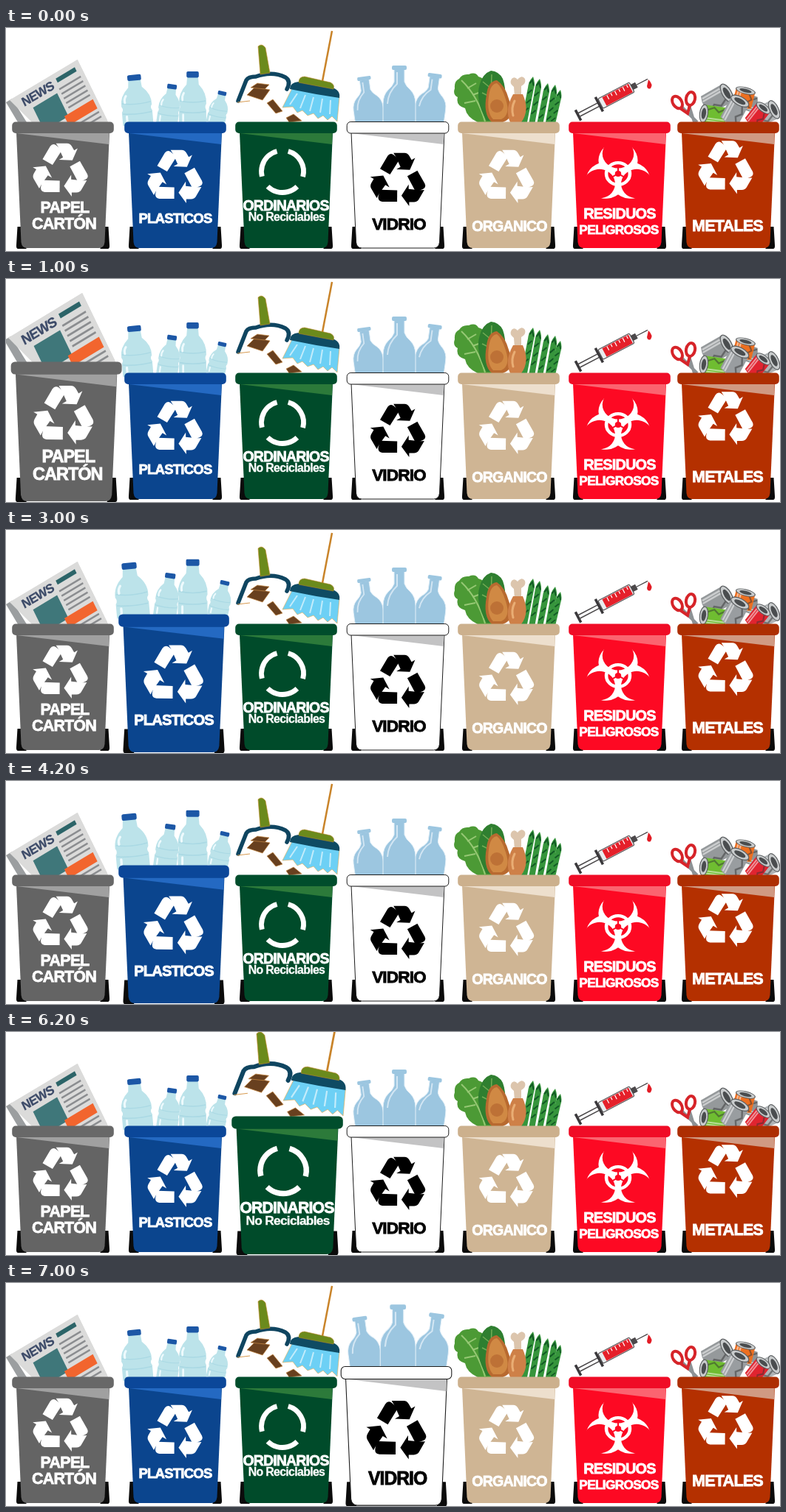
Animation of 1047x303 px, one loop 8000 ms. Source, as an HTML page:

```html
<!DOCTYPE html>
<html lang="es">
<head>
<meta charset="utf-8">
<title>Reciclaje</title>
<style>
html, body { margin: 0; width: 100%; height: 100%; overflow: hidden; background: #fff; }
svg { display: block; width: 100%; height: 100%; }
text { font: bold 19.400px "Liberation Sans", Arial, sans-serif; letter-spacing: -.04em; text-anchor: middle; fill: #fff; stroke: #fff; stroke-width: .8px; }
.grow { animation: grow 8s step-end infinite; }
#papel { --to: translate(-2.3px, -28.4px) scale(1.09, 1.105); animation-delay: -7s; }
#plastico { --to: translate(-21.9px, -25px) scale(1.087, 1.094); animation-delay: -5s; }
#ordinario { --to: translate(-34.1px, -25px) scale(1.094); animation-delay: -3s; }
#vidrio { --to: translate(-48.1px, -26.8px) scale(1.087, 1.1); animation-name: growLast; }
@keyframes grow { 0% { transform: var(--to); } 25%, 100% { transform: none; } }
@keyframes growLast { 0% { transform: none; } 87.5% { transform: var(--to); } 100% { transform: none; } }
</style>
</head>
<body>
<svg viewBox="0 0 1047 303" preserveAspectRatio="none">
<defs>
  <g id="bin">
    <path d="M8 270H20V300H9Q6 300 6.500 295ZM131 270H120V300H130Q133 300 132.500 295Z" fill="#0b0b0b"/>
    <path d="M6.500 142H132.500L126 291Q125 299 118 299H21Q14 299 13 291Z" style="fill:var(--body);stroke:var(--line,none)"/>
    <path d="M7 143H132L131.500 158Z" style="fill:var(--shade)"/>
    <rect x=".7" y="127.500" width="137.600" height="15.500" rx="5" style="fill:var(--rim);stroke:var(--line,none)"/>
  </g>

  <g id="arm">
    <path d="M-31-20L-18-42Q-14-48-8-44Q-2-40 1-34L-14-10Z"/>
    <path d="M-8-47H11Q16-47 19-42L23-35L29-38.500L20-18L-3-19L4-23L-1-34Q-4-41-8-47Z"/>
  </g>
  <g id="recycle" transform="scale(.79)">
    <use href="#arm"/>
    <use href="#arm" transform="rotate(120)"/>
    <use href="#arm" transform="rotate(240)"/>
  </g>

  <circle id="lobe" cy="-11" r="15" fill="#fff"/>
  <circle id="cut" cy="-16.500" r="12" fill="#000"/>
  <path id="slit" d="M0 0V-7" stroke="#000" stroke-width="1.200"/>
  <mask id="hazard" maskUnits="userSpaceOnUse" x="-30" y="-30" width="60" height="60">
    <use href="#lobe"/><use href="#lobe" transform="rotate(120)"/><use href="#lobe" transform="rotate(240)"/>
    <use href="#cut"/><use href="#cut" transform="rotate(120)"/><use href="#cut" transform="rotate(240)"/>
    <circle r="9" fill="none" stroke="#fff" stroke-width="2.600"/>
    <circle r="2.400" fill="#000"/>
    <use href="#slit"/><use href="#slit" transform="rotate(120)"/><use href="#slit" transform="rotate(240)"/>
  </mask>

  <g id="pet">
    <path d="M-8 7H8L9 17Q21 28 20 42Q17 46 20 50V68H-20V50Q-17 46-20 42Q-21 28-9 17Z" fill="#bce3ea"/>
    <path d="M-19 38Q0 42 19 38M-19 52Q0 55 19 52" fill="none" stroke="#aad9e4" stroke-width="1.500"/>
    <path d="M-13 28Q-16 32-15 37M-14 56V64" fill="none" stroke="#eefafd" stroke-width="3" stroke-linecap="round"/>
    <rect x="-9" width="18" height="8" rx="2" fill="#1c57a6"/>
  </g>

  <g id="flask">
    <path d="M-7 5V22Q-9 28-15 33Q-22 40-22 52V80H22V52Q22 40 15 33Q9 28 7 22V5Z" stroke="#e4f0f8"/>
    <rect x="-10" width="20" height="6" rx="2"/>
    <path d="M-3 9V25Q-15 36-16 52" fill="none" stroke="#d3e6f3" stroke-width="2"/>
  </g>

  <g id="stalk">
    <path d="M0 0Q5 8 4 16V64H-4V16Q-5 8 0 0Z" fill="#36953c"/>
    <path d="M-3 10L0 5L3 12M-3 24L2 18M-2 37L3 31M-3 49L2 43" fill="none" stroke="#125a25" stroke-width="2"/>
  </g>

  <g id="can">
    <path d="M-11-12H11V14Q0 19-11 14Z" fill="currentColor"/>
    <path d="M-8-8V14M-5-8V15" stroke="#fff" stroke-opacity=".5" stroke-width="2"/>
    <path d="M5-8L9 0L4 6L9 14" fill="none" stroke="#333" stroke-opacity=".5" stroke-width="2"/>
    <ellipse cy="-12" rx="11" ry="5" fill="#c9cccd" stroke="#5d6062"/>
    <ellipse cy="-12" rx="7" ry="2.800" fill="#4a4d4f"/>
  </g>
</defs>

<g id="papel" class="grow">
  <path d="M0 101L8 96L28 128H16Z" fill="#9b9ea0"/>
  <g transform="matrix(.857 -.515 .44 .9 5 98)">
    <path d="M0 0H107V92L23 42Z" fill="#d8d8d7"/>
    <path d="M0 0H107V94H100L14 42Z" fill="#dbdbda"/>
    <text x="38" y="18" style="font-size:17px;fill:#3c4a68;stroke:#3c4a68;stroke-width:.3px">NEWS</text>
    <path d="M69 7H99V13H69Z" fill="#2c6468"/>
    <path d="M24 25H62V60H24Z" fill="#3f777a"/>
    <path d="M67 22H101M67 29H101M67 36H101M67 43H101M67 50H101" stroke="#8b8d90" stroke-width="2.500"/>
    <path d="M57 57H102V71H57Z" fill="#f2652e"/>
    <path d="M54 76H102M64 83H102" stroke="#8b8d90" stroke-width="2.500"/>
  </g>
  <use href="#bin" x="7.500" style="--body:#646464;--rim:#686868;--shade:#a0a0a0"/>
  <use href="#recycle" x="74" y="194" fill="#fff"/>
  <text x="79.500" y="251" style="font-size:21.500px">PAPEL</text>
  <text x="78.500" y="273" style="font-size:21.500px">CARTÓN</text>
</g>

<g id="plastico" class="grow">
  <use href="#pet" transform="translate(173 63.500) rotate(-5) scale(1.030 1)"/>
  <use href="#pet" transform="translate(225 76.500) rotate(8) scale(.72 .8)"/>
  <use href="#pet" transform="translate(252.500 59) scale(.92 1.050)"/>
  <use href="#pet" transform="translate(293 86) rotate(13) scale(.64 .66)"/>
  <use href="#bin" x="159.500" style="--body:#0b458e;--rim:#0b4799;--shade:#2469c2"/>
  <use href="#recycle" x="229" y="203" fill="#fff"/>
  <text x="229" y="265" style="font-size:18.500px">PLASTICOS</text>
</g>

<g id="ordinario" class="grow">
  <path d="M321 101L330 70Q333 63 343 64Q361 57 378 63Q388 68 383 76L397 83L389 101L312 103Z" fill="#fff"/>
  <path d="M314 99L325 71Q328 66 338 66Q360 58 378 67Q386 72 380 83" fill="none" stroke="#0f4560" stroke-width="5.500" stroke-linecap="round"/>
  <path d="M313 101L330 99" stroke="#d79a50"/>
  <path d="M341 25Q346 20 351 27L357 61L344 63Z" fill="#6b8a1c" stroke="#c98b2d" stroke-width=".6"/>
  <g fill="#68401f" stroke="#c88a45" stroke-width=".7">
    <path d="M326 91L337 80L357 84L347 98Z"/>
    <path d="M331 81L340 75L356 77L350 83Z"/>
    <path d="M353 102L361 97L374 113L365 116Z"/>
    <path d="M379 122L389 117L400 126L383 128Z"/>
  </g>
  <path d="M441 4L428 72" stroke="#c9842a" stroke-width="2.500"/>
  <path d="M388 80L451 94L448 127L441 120L435 125L429 119L422 123L416 116L408 119L401 112L394 115L388 107L374 108Z" fill="#6dd0f5" stroke="#eaa94a" stroke-width=".6"/>
  <path d="M394 89L384 104M405 91L398 109M416 94L411 113M428 96L425 115M439 98L438 117" stroke="#c3ecfb" stroke-width="2"/>
  <path d="M384 83Q384 74 396 73L439 80Q453 84 451 95Q417 90 384 83Z" fill="#0f4b63"/>
  <path d="M396 74Q396 66 404 66L439 74Q445 77 443 83Z" fill="#6b8a1c" stroke="#bb872d" stroke-width=".6"/>
  <use href="#bin" x="309.500" style="--body:#004b2a;--rim:#004d2c;--shade:#2c7a3a"/>
  <circle cx="374" cy="195" r="28.500" fill="none" stroke="#fff" stroke-width="6.800" stroke-dasharray="44 15.690" transform="rotate(-74.200 374 195)"/>
  <text x="378.500" y="248">ORDINARIOS</text>
  <text x="379.500" y="262" style="font-size:15.800px;stroke-width:.3px">No Reciclables</text>
</g>

<g id="vidrio" class="grow">
  <g fill="#9cc6e0">
    <use href="#flask" transform="translate(484 66) rotate(-8) scale(.92 .85)"/>
    <use href="#flask" transform="translate(580.500 62) rotate(8) scale(.95 .9)"/>
    <use href="#flask" transform="translate(532 51)"/>
  </g>
  <use href="#bin" x="460.500" style="--body:#fff;--rim:#fff;--shade:#c3c3c4;--line:#1c1c1c"/>
  <use href="#recycle" x="530.500" y="207" fill="#000"/>
  <text x="531.500" y="273.500" style="font-size:22.700px;fill:#000;stroke:#000">VIDRIO</text>
</g>

<g>
  <path d="M607 82Q606 72 613 69Q617 62 626 63Q635 59 639 66Q648 68 648 76Q656 88 653 100L662 128H638Q623 121 621 109Q608 105 611 94Q604 91 607 82Z" fill="#4c9a35"/>
  <path d="M616 71Q638 92 648 127M624 82L636 75M631 91L645 86M635 99L620 102" fill="none" stroke="#96c874" stroke-width="2"/>
  <path d="M650 126Q634 98 641 76Q645 62 656 58Q667 59 672 69Q681 94 666 126Z" fill="#2f7f30"/>
  <path d="M657 63Q655 96 659 126M656 82L645 73M656 94L644 88" fill="none" stroke="#74ad56" stroke-width="1.500"/>
  <use href="#stalk" transform="translate(713 66) rotate(11)"/>
  <use href="#stalk" transform="translate(722 69) rotate(10)"/>
  <use href="#stalk" transform="translate(733 75) rotate(11)"/>
  <use href="#stalk" transform="translate(743 77) rotate(10)"/>
  <use href="#stalk" transform="translate(750 84) rotate(13) scale(.9)"/>
  <path d="M650 91Q652 72 664 71Q675 78 680 96Q690 122 672 128H657Q645 117 650 91Z" fill="#b86a30"/>
  <path d="M653 93Q655 76 664 75Q671 80 676 97Q683 118 670 124H659Q650 115 653 93Z" fill="#d08944"/>
  <circle cx="664" cy="106" r="9" fill="#bd7136"/>
  <path d="M688 94L687 80Q680 75 684 69Q688 65 692 70Q698 63 702 69Q704 75 697 79L697 95Z" fill="#dcc5ad"/>
  <path d="M686 90H699Q709 112 697 128H682Q674 111 686 90Z" fill="#ce8048"/>
  <path d="M688 99Q683 109 686 119" fill="none" stroke="#e9ad74" stroke-width="3" stroke-linecap="round"/>
  <use href="#bin" x="610.500" style="--body:#cfb594;--rim:#ccb08d;--shade:#eddfcd"/>
  <use href="#recycle" x="677.500" y="203" fill="#fff"/>
  <text x="681" y="276" style="font-size:19.600px">ORGANICO</text>
</g>

<g>
  <g transform="translate(774 118.500) rotate(-27.600)">
    <path d="M0-8V8" stroke="#3a383b" stroke-width="3.500"/>
    <path d="M0-2.500H32M0 2.500H32" stroke="#4b484a" stroke-width="1.500"/>
    <path d="M32-11V11" stroke="#3a383b" stroke-width="3.500"/>
    <rect x="34" y="-7.500" width="48" height="15" rx="2" fill="#e8edef" stroke="#5a5658" stroke-width="1.200"/>
    <path d="M40-6.500H80V6.500H40Z" fill="#e5202a"/>
    <path d="M47-6V0M53-6V-2M59-6V0M65-6V-2M71-6V0M77-6V-2" stroke="#fff" stroke-width="1.200"/>
    <path d="M82-4H89V4H82Z" fill="#4b484a"/>
    <path d="M89 0H106" stroke="#4b484a" stroke-width="1.300"/>
  </g>
  <path d="M869 70Q876 77 872 82Q868 84 867 79Z" fill="#e21c25"/>
  <use href="#bin" x="760.500" style="--body:#fd0923;--rim:#f00c26;--shade:#fb6470"/>
  <g transform="translate(828 198) scale(1.770 1.650)">
    <path d="M-30-30H30V30H-30Z" fill="#fff" mask="url(#hazard)"/>
  </g>
  <text x="830" y="258.500" style="font-size:19.900px">RESIDUOS</text>
  <text x="829" y="279.500" style="font-size:17.300px">PELIGROSOS</text>
</g>

<g>
  <use href="#can" transform="translate(962 96) rotate(60) scale(1.250)" color="#95999b"/>
  <use href="#can" transform="translate(1000 100) rotate(-72)" color="#8f9395"/>
  <use href="#can" transform="translate(998 95) rotate(14) scale(1.200 .85)" color="#ed6f20"/>
  <use href="#can" transform="translate(1026 117) rotate(65) scale(1.200)" color="#b0b4b6"/>
  <use href="#can" transform="translate(1017 118) rotate(38)" color="#e02430"/>
  <use href="#can" transform="translate(957 118) rotate(-82) scale(1.100)" color="#6fbd31"/>
  <use href="#can" transform="translate(986 112) rotate(28) scale(1.200)" color="#999da0"/>
  <g fill="none">
    <path d="M914 107L935 128M924 105L931 128" stroke="#8d9295" stroke-width="4"/>
    <ellipse cx="908" cy="101" rx="6" ry="9" transform="rotate(-32 908 101)" stroke="#d62429" stroke-width="4"/>
    <ellipse cx="926" cy="96" rx="6" ry="9" transform="rotate(12 926 96)" stroke="#d62429" stroke-width="4"/>
    <path d="M912 109L922 116L925 105" stroke="#d62429" stroke-width="4"/>
  </g>
  <use href="#bin" x="907.500" style="--body:#b43000;--rim:#ad2e02;--shade:#d09a83"/>
  <use href="#recycle" x="974" y="190.500" fill="#fff"/>
  <text x="976" y="275.500" style="font-size:21.700px">METALES</text>
</g>
</svg>
</body>
</html>
```
